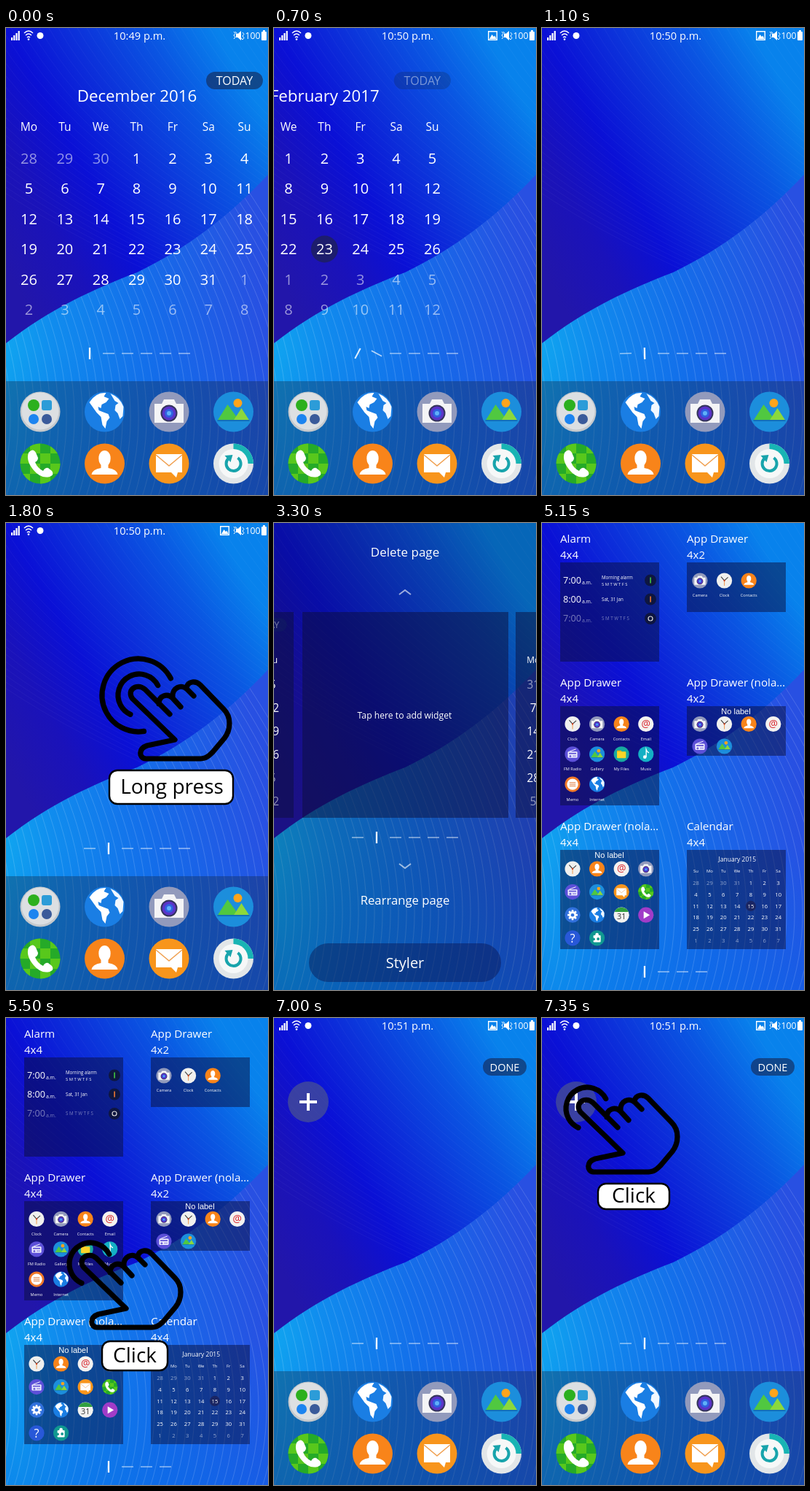
Write an HTML page with a canvas that moves like this. It is 360 by 640 pixels and loops after 8 s.

```html
<!DOCTYPE html>
<html lang="en">
<head>
<meta charset="utf-8">
<title>Adding a widget</title>
<style>
html, body { margin: 0; width: 100%; height: 100%; overflow: hidden; background: #0a14d8; }
canvas { display: block; width: 360px; height: 640px; }
</style>
</head>
<body>
<canvas></canvas>
<script>
const canvas = document.querySelector('canvas');
const dpr = window.devicePixelRatio || 1;
canvas.width = 360 * dpr;
canvas.height = 640 * dpr;
const c = canvas.getContext('2d');
const SANS = '"Open Sans", "Noto Sans", sans-serif';

// ---------- helpers ----------
function at(x, y, scale, draw) {
  c.save();
  c.translate(x, y);
  c.scale(scale, scale);
  draw();
  c.restore();
}
// y is the middle of the capital letters
function text(s, x, y, size, align = 'center', color = '#fff', font = SANS) {
  c.font = `${size}px ${font}`;
  c.textAlign = align;
  c.fillStyle = color;
  c.fillText(s, x, y + size * 0.357);
}
function white(a) { return `rgba(255,255,255,${a})`; }
function black(a) { return `rgba(0,0,0,${a})`; }
function box(x, y, w, h, color, r = 0) {
  c.fillStyle = color;
  c.beginPath();
  c.roundRect(x, y, w, h, r);
  c.fill();
}
function disc(x, y, r, color) {
  c.fillStyle = color;
  c.beginPath();
  c.arc(x, y, r, 0, 7);
  c.fill();
}
function fill(d, color) {
  c.fillStyle = color;
  c.fill(new Path2D(d));
}
function line(d, color, width) {
  c.strokeStyle = color;
  c.lineWidth = width;
  c.stroke(new Path2D(d));
}
function gradient(x0, y0, x1, y1, stops) {
  const g = c.createLinearGradient(x0, y0, x1, y1);
  stops.forEach(([p, color]) => g.addColorStop(p, color));
  return g;
}

// ---------- wallpaper ----------
const EDGE = 'M0 432C60 385 120 358 180 335C250 301 305 259 360 201';
const WAVE = new Path2D(EDGE + 'V640H0Z');

function wallpaper() {
  box(0, 0, 360, 640, gradient(0, 330, 360, 130,
    [[0, '#2216aa'], [0.2, '#1a12ba'], [0.39, '#0a10d6'], [0.58, '#0c30da'], [0.8, '#0a56e2'], [1, '#0882ec']]));
  for (let i = 0; i < 46; i++) {
    const x = i * 13 - 230;
    line(`M${x} -5Q${x + 110} 190 ${x + 420} 330`, white(0.06), 0.7);
  }
  c.save();
  c.clip(WAVE);
  box(0, 200, 360, 440, gradient(0, 470, 360, 420,
    [[0, '#10a6f0'], [0.2, '#108cee'], [0.55, '#146eea'], [1, '#2850e2']]));
  box(0, 440, 360, 200, gradient(0, 440, 0, 640, [[0, 'rgba(8,100,230,0)'], [1, 'rgba(8,100,230,.45)']]));
  for (let i = 0; i < 48; i++) {
    const x = i * 11 - 130;
    line(`M${x - 70} 200C${x + 20} 330 ${x + 100} 490 ${x + 36} 660`, white(0.2), 0.8);
  }
  c.restore();
}

// ---------- icons, drawn in a circle of radius 27.5 ----------
const HANDSET = 'M-16-15Q-10-22-6-15L-3-8Q-3-4-7-2Q-4 6 4 10Q7 5 11 6L16 10Q20 15 13 18Q1 21-9 9Q-20-4-16-15Z';
const icons = {
  folder() {
    disc(0, 0, 27.5, '#c4c8cc');
    disc(0, -1, 25.5, '#dcdfe2');
    disc(-9, -9, 8, '#2cb01e');
    box(2, -16, 14, 14, '#2c9cd8', 3);
    disc(-9, 10, 7, '#1c84f0');
    disc(9, 10, 7, '#3a5a9a');
  },
  globe() {
    disc(0, 0, 27.5, '#1a7ee4');
    fill('M-21-13Q-12-27 2-26L-1-21L6-18L2-13L-4-10L-5-5L-9-7L-8-2L-3 0L5 3L7 8L3 13L1 23L-3 18L-5 7L-11 1L-16-6Z', '#fff');
    fill('M8-25Q21-20 26-7L25 6L21 10L18 2L14-2L15-9L19-12L14-15Z', '#f2f8ff');
  },
  camera() {
    disc(0, 0, 27.5, '#929abc');
    fill('M-20-11H-10L-7-17H7L10-11H20V15H-20Z', '#f4f4f6');
    disc(0, 2, 11.5, '#34345c');
    disc(0, 2, 9.5, '#5a34c8');
    disc(0, 2, 6, '#3060e0');
    disc(0, 2, 3, '#60b0f8');
  },
  gallery() {
    disc(0, 0, 27.5, '#1c8edc');
    disc(6, -12, 6, '#ffa41c');
    fill('M-22 12L-8-10L8 12Z', '#50c840');
    fill('M0 12L11-5L22 12Z', '#8cd83c');
    box(-22, 11, 44, 2, '#1470b8');
  },
  phone() {
    disc(0, 0, 27.5, '#25aa28');
    c.save();
    c.beginPath();
    c.arc(0, 0, 27.5, 0, 7);
    c.clip();
    for (let i = 0; i < 16; i++) {
      const col = i % 4, row = i >> 2;
      if ((col + row) % 2) box(col * 14 - 28, row * 14 - 28, 14, 14, '#58c81c');
    }
    c.restore();
    fill(HANDSET, '#fff');
  },
  contact() {
    disc(0, 0, 27.5, '#f8841a');
    fill('M-18 15Q-17 8-5 6V2Q-9-3-8-10Q-6-18 0-18Q6-18 8-10Q9-3 5 2V6Q17 8 18 15Z', '#fff');
  },
  mail() {
    disc(0, 0, 27.5, '#f8951c');
    fill('M-18-13H18V12H12L10 19L3 12H-18Z', '#fff');
    line('M-18-12L0 3L18-12', '#f0a050', 1.5);
  },
  refresh() {
    disc(0, 0, 27.5, '#e2e6e8');
    fill('M0 0V-27.5A27.5 27.5 0 0 1 27.5 0Z', '#18b4b4');
    disc(0, 0, 20, '#f6f8f8');
    line('M6-8A10 10 0 1 1-7-7', '#18a4ac', 4);
    fill('M-12-11L-1-12L-4-2Z', '#18a4ac');
  },
  clock() {
    disc(0, 0, 27.5, '#f0f0ee');
    line('M-12-14L0 0L13-12', '#444', 3);
    line('M0 0V18', '#f08020', 2);
    disc(0, 0, 3, '#d04020');
  },
  email() {
    disc(0, 0, 27.5, '#f4f2f0');
    text('@', 0, -2, 36, 'center', '#d8242c');
  },
  radio() {
    disc(0, 0, 27.5, '#5c50d8');
    line('M-12-9L12-18', '#fff', 2.5);
    box(-17, -9, 34, 22, '#f0f0ff', 3);
    box(-13, -5, 26, 5, '#6c60d8');
    disc(-8, 7, 4, '#6c60d8');
    box(0, 4, 13, 5, '#a8a0e8');
  },
  files() {
    disc(0, 0, 27.5, '#18a8a0');
    box(-16, -13, 16, 10, '#f0b010', 2);
    box(-16, -9, 32, 23, '#fcd428', 2);
  },
  music() {
    disc(0, 0, 27.5, '#14b0c4');
    disc(-4, 10, 6, '#fff');
    line('M1 10V-16Q4-7 11-5', '#fff', 3.5);
  },
  memo() {
    disc(0, 0, 27.5, '#f07828');
    disc(0, 0, 20, '#fff');
    line('M-11-6H11M-11 0H11M-11 6H11', '#e07838', 2.5);
  },
  gear() {
    disc(0, 0, 27.5, '#3070dc');
    for (let i = 0; i < 8; i++) {
      c.rotate(Math.PI / 4);
      box(-3.5, -18, 7, 9, '#fff', 1);
    }
    disc(0, 0, 13, '#fff');
    disc(0, 0, 6, '#3070dc');
  },
  date() {
    disc(0, 0, 27.5, '#f2f2f0');
    fill('M-25-11A27.5 27.5 0 0 1 25-11Z', '#30a040');
    text('31', 0, 4, 28, 'center', '#333');
  },
  play() {
    disc(0, 0, 27.5, '#a03cc8');
    fill('M-8-13L14 0L-8 13Z', '#fff');
  },
  help() {
    disc(0, 0, 27.5, '#2858d8');
    text('?', 0, 0, 42);
  },
  puzzle() {
    disc(0, 0, 27.5, '#109890');
    box(-13, -10, 26, 25, '#fff', 3);
    disc(0, -12, 6, '#fff');
    disc(-12, 4, 5, '#109890');
    disc(4, 3, 5, '#109890');
  }
};
function icon(name, x, y, r) { at(x, y, r / 27.5, icons[name]); }

// ---------- shared parts ----------
const MONTHS = { 0: 'January', 1: 'February', 10: 'November', 11: 'December' };
const DAYS = ['Su', 'Mo', 'Tu', 'We', 'Th', 'Fr', 'Sa'];
const PILL = 'rgba(20,42,90,.65)';

function calendar(year, month, firstDay = 1, today = 0) {
  const lead = (new Date(year, month, 1).getDay() - firstDay + 7) % 7;
  text(`${MONTHS[month]} ${year}`, 180, 93.5, 22.3);
  for (let i = 0; i < 42; i++) {
    const x = 31.5 + (i % 7) * 49.35, y = 178.5 + Math.floor(i / 7) * 41.5;
    const d = new Date(year, month, 1 - lead + i);
    const inside = d.getMonth() === month;
    if (i < 7) text(DAYS[(i + firstDay) % 7], x, 135, 15.5);
    if (inside && d.getDate() === today) disc(x, y, 18.5, 'rgba(30,32,84,.75)');
    text(d.getDate(), x, y, 20, 'center', white(inside ? 1 : 0.55));
  }
}
function todayButton(alpha) {
  c.save();
  c.globalAlpha = alpha;
  box(275, 60, 78, 24, PILL, 12);
  text('TODAY', 314, 72, 16);
  c.restore();
}
function february() {
  calendar(2017, 1, 1, 23);
  todayButton(0.45);
}
// Each mark turns upright as its page comes into view
function pager(x, y, count, page) {
  for (let i = 0; i < count; i++) {
    const on = Math.max(0, 1 - Math.abs(page - i));
    c.save();
    c.translate(x + i * 26, y);
    c.rotate((i <= page ? -1 : 1) * on * Math.PI / 2);
    box(-8, -0.75 - on * 0.4, 16, 1.5 + on * 0.8, white(0.55 + 0.45 * on));
    c.restore();
  }
}
function statusBar(time, picture) {
  for (let i = 0; i < 4; i++) box(7 + i * 3.2, 13 - i * 3, 2.2, 4 + i * 3, '#fff');
  line('M25 7Q31 1 37 7M27 10Q31 6 35 10M29 13Q31 11 33 13', '#fff', 1.4);
  disc(31, 15.5, 1.3, '#fff');
  disc(47, 10.5, 4.5, '#fff');
  text(time + ' p.m.', 183.5, 11, 14.6);
  if (picture) {
    line('M294.7 4.7H306.3V16.3H294.7Z', '#fff', 1.4);
    fill('M296 15L299.5 9L302 12L303.5 10.5L305.5 15Z', '#fff');
  }
  fill('M316 8H318.5L323 4V17L318.5 13H316Z', '#fff');
  line('M313 5L315 7.5L313 10L315 12.5L313 15M325 6L327 8.5L325 11L327 13.5L325 16M315 5L325 16', '#fff', 1);
  text('100', 339, 10.5, 12.3);
  box(351, 5, 7, 12, '#fff', 1);
  box(353, 3, 3, 3, '#fff');
}
function dock() {
  box(0, 484, 360, 156, 'rgba(20,40,75,.38)');
  ['folder', 'globe', 'camera', 'gallery', 'phone', 'contact', 'mail', 'refresh']
    .forEach((name, i) => icon(name, 47 + (i % 4) * 88.5, i < 4 ? 526 : 597, 27.5));
}
function hand(x, y, longPress) {
  c.save();
  c.translate(x, y);
  c.lineCap = c.lineJoin = 'round';
  c.strokeStyle = '#000';
  c.lineWidth = 7.2;
  c.beginPath();
  c.arc(187, 246, 29, -0.48, 2, true);
  c.stroke();
  if (longPress) {
    c.beginPath();
    c.arc(186, 246, 50, -0.48, 1.42, true);
    c.stroke();
  }
  line('M229 272L195 238C183 228 169 240 178 251L236 307L198 315C186 319 186 332 196 333H268C277 333 280 332 288 324' +
    'L304 305C313 293 314 276 303 265L271 232C265 226 254 226 252 236' +
    'M262 247L253 238C245 230 232 236 233 248M244 262L233 250C226 243 214 246 214 258', '#000', 7.2);
  c.restore();
}
function label(s, x, y, w, h, textX) {
  box(x, y, w, h, '#fff', 11);
  c.strokeStyle = '#000';
  c.lineWidth = 2.4;
  c.stroke();
  text(s, textX, y + h / 2 - 1, 28, 'center', '#000');
}

// ---------- screens ----------
function home(time, page, content) {
  statusBar(time, time !== '10:49');
  at(-page * 360, 0, 1, content);
  pager(115, 446, 6, page);
  dock();
}
function editScreen() {
  box(0, 0, 360, 640, black(0.22));
  [-256, 39, 332].forEach(x => box(x, 122, 283, 282, 'rgba(12,14,60,.5)'));
  at(-254, 84, 0.77, february);
  at(332, 84, 0.77, () => calendar(2016, 10));
  text('Delete page', 180, 40, 17);
  line('M172 98L180 92L188 98M172 467L180 473L188 467', white(0.6), 2);
  text('Tap here to add widget', 179.5, 264, 12.2);
  pager(115, 431, 6, 1);
  text('Rearrange page', 180, 517.5, 16.7);
  box(48, 576, 264, 53, 'rgba(10,20,80,.45)', 26.5);
  text('Styler', 180, 603, 20);
}
function widget(name, size, x, y, h) {
  text(name, x, y - 32.5, 15.2, 'left');
  text(size, x, y - 10.5, 15, 'left');
  box(x, y, 136, h, 'rgba(10,15,60,.5)');
}
function iconGrid(names, x, y, step, labels) {
  names.split(' ').forEach((name, i) => {
    const ix = x + (i % 4) * 33.6, iy = y + Math.floor(i / 4) * step;
    icon(name, ix, iy, 10.6);
    if (labels) text(labels[i], ix, iy + 20.5, 5.6);
  });
}
function alarm(time, y, note, days, mark, alpha) {
  text(time, 29, y, 12.6, 'left', white(alpha));
  text('a.m.', 55, y + 3, 6.8, 'left', white(alpha));
  text(note, 82, days ? y - 4 : y, 6.2, 'left', white(alpha));
  if (days) text(days, 82, y + 5, 5.8, 'left', white(alpha));
  disc(149, y, 8, 'rgba(15,20,45,.8)');
  if (mark) box(148.3, y - 4, 1.6, 8, mark);
  else {
    c.strokeStyle = '#ddd';
    c.lineWidth = 1.2;
    c.beginPath();
    c.arc(149, y, 3, 0, 7);
    c.stroke();
  }
}
function widgetList() {
  const week = 'S M T W T F S', arial = '"Liberation Sans", Arial, sans-serif';
  widget('Alarm', '4x4', 25, 54, 136);
  alarm('7:00', 78.5, 'Morning alarm', week, '#40c840', 1);
  alarm('8:00', 104.5, 'Sat, 31 Jan', '', '#f07830', 1);
  alarm('7:00', 131, week, '', '', 0.45);

  widget('App Drawer', '4x2', 199, 54, 68);
  iconGrid('camera clock contact', 217, 79, 31, ['Camera', 'Clock', 'Contacts']);

  widget('App Drawer', '4x4', 25, 251, 136);
  iconGrid('clock camera contact email radio gallery files music memo globe', 42, 275.5, 41.3,
    ['Clock', 'Camera', 'Contacts', 'Email', 'FM Radio', 'Gallery', 'My Files', 'Music', 'Memo', 'Internet']);

  widget('App Drawer (nola…', '4x2', 199, 251, 68);
  iconGrid('camera clock contact email radio gallery', 217, 275.5, 30.5);
  text('No label', 266.5, 258, 11, 'center', '#fff', arial);

  widget('App Drawer (nola…', '4x4', 25, 448, 136);
  iconGrid('clock contact email camera radio gallery mail phone gear globe date play help puzzle', 42, 474, 31.6);
  text('No label', 92.5, 455, 11, 'center', '#fff', arial);

  widget('Calendar', '4x4', 199, 448, 136);
  at(199.5, 425, 0.382, () => calendar(2015, 0, 0, 15));
  pager(141, 615, 4, 0);
}
function placeScreen() {
  home('10:51', 1, () => {});
  box(287, 55, 60, 24, PILL, 12);
  text('DONE', 317, 67.5, 14.5);
  disc(47, 115, 28, 'rgba(80,90,140,.65)');
  box(45, 103, 4, 24, '#fff');
  box(35, 113, 24, 4, '#fff');
}

// ---------- timeline ----------
const SLIDE = [0, 0.11, 0.306, 0.58, 0.8, 0.93, 0.985];

function render(t) {
  c.setTransform(dpr, 0, 0, dpr, 0, 0);
  wallpaper();
  if (t < 500) {
    home('10:49', 0, () => { calendar(2016, 11); todayButton(1); });
  } else if (t < 3300) {
    const step = Math.min(6, Math.floor((t - 500) / 100));
    home('10:50', t < 1300 ? SLIDE[step] : 1, february);
    if (t >= 1800) {
      hand(-4, -10, true);
      label('Long press', 142, 339, 170, 46, 228);
    }
  } else if (t < 5150) {
    editScreen();
    if (t >= 3650) {
      hand(0, 0);
      label('Click', 187, 346, 95, 40, 233);
    }
  } else if (t < 7000) {
    widgetList();
    if (t >= 5500) {
      hand(-71, 91);
      label('Click', 132, 443, 90, 40, 177);
    }
  } else {
    placeScreen();
    if (t >= 7350) {
      hand(-125, -122);
      label('Click', 77, 227, 98, 35, 126);
    }
  }
}
const start = performance.now();
function tick() {
  render((performance.now() - start) % 8000);
  requestAnimationFrame(tick);
}
tick();
</script>
</body>
</html>
```
